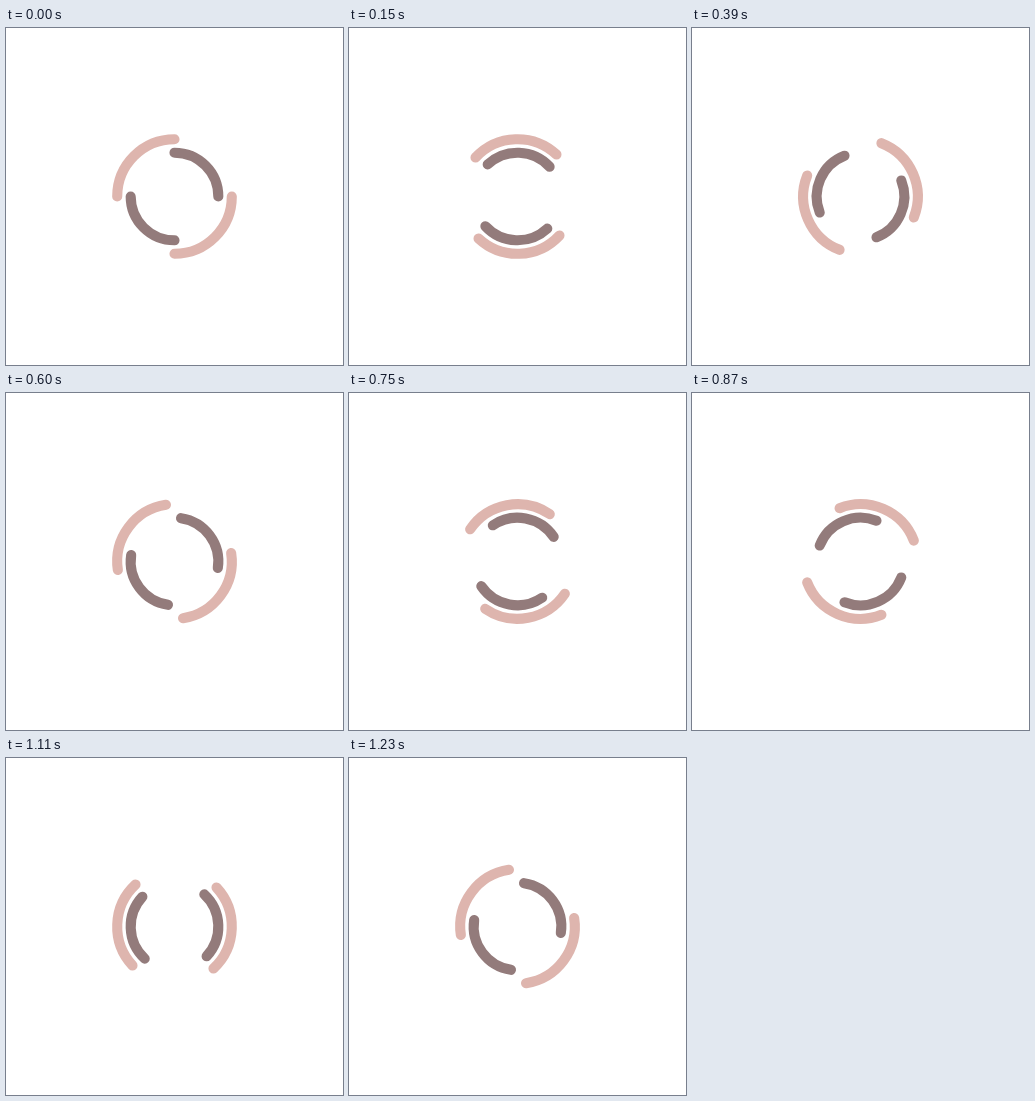
Animation of 337 by 337 pixels, one loop 1260 ms. Source, as an HTML page:

```html
<!DOCTYPE html>
<html lang="en">
<head>
<meta charset="utf-8">
<title>Double ring spinner</title>
<style>
  html, body { margin: 0; width: 100%; height: 100%; overflow: hidden; background: #fff; }
  svg { display: block; width: 100vw; height: 100vh; }
  path { fill: none; stroke-width: 3; stroke-linecap: round; }
</style>
</head>
<body>
<svg viewBox="0 0 100 100">
  <path id="outer" stroke="#deb5ae" d="M67 50A17 17 0 0 1 50 67M33 50A17 17 0 0 1 50 33"/>
  <path id="inner" stroke="#937b7b" d="M50 37A13 13 0 0 1 63 50M50 63A13 13 0 0 1 37 50"/>
</svg>
<script>
  const LOOP = 1260, STEP = 30;
  const outer = document.getElementById('outer');
  const inner = document.getElementById('inner');
  const start = performance.now();

  const turn = (el, deg) => el.setAttribute('transform', `rotate(${deg} 50 50)`);

  function draw(ms) {
    const t = Math.floor((ms % LOOP) / STEP) * STEP;
    const deg = 360 * t / LOOP;
    turn(outer, deg);
    turn(inner, -deg);
  }

  function tick() {
    draw(performance.now() - start);
    requestAnimationFrame(tick);
  }
  tick();
</script>
</body>
</html>
```
